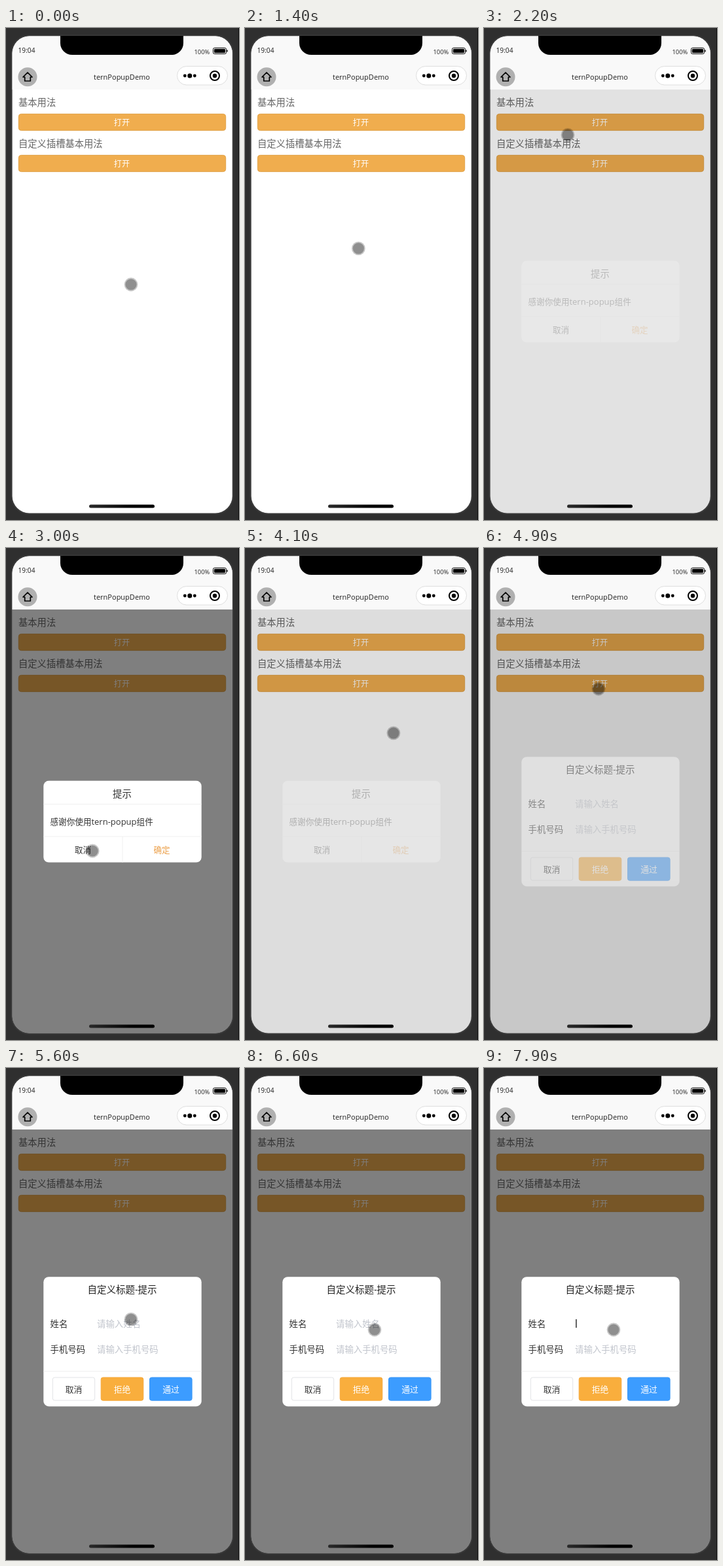
These frames come from a looping animation (356 by 752 pixels, 8 s). An HTML page:

```html
<!DOCTYPE html>
<html lang="zh-CN">
<head>
<meta charset="utf-8">
<title>Modal demo</title>
<style>
  html, body { margin: 0; height: 100%; overflow: hidden; background: #2f2f2f; }
  svg { display: block; width: 100vw; height: 100vh; }
  text { font-family: "Open Sans", "Noto Sans CJK SC", "Noto Sans CJK", sans-serif; }
  .mid { text-anchor: middle; }
  .line { stroke: #f0f0f0; }
</style>
</head>
<body>
<svg viewBox="0 0 356 752">
  <defs>
    <clipPath id="screen"><rect x="9.6" y="12.6" width="336.2" height="728.8" rx="26"/></clipPath>
    <linearGradient id="bar"><stop stop-color="#2a2a2a"/><stop offset=".7"/></linearGradient>
  </defs>
  <rect width="356" height="752" fill="#2f2f2f"/>
  <rect x="355" width="1" height="752" fill="#0c0c0c"/>
  <rect x="9" y="12" width="337.4" height="730" rx="26.5" fill="none" stroke="#3a3a3a" stroke-width="3"/>

  <g clip-path="url(#screen)">
    <rect x="9" y="12" width="338" height="731" fill="#fff"/>
    <rect x="9" y="12" width="338" height="82" fill="#f9f9f9"/>

    <g font-size="14.3" fill="#666">
      <text x="19" y="119">基本用法</text>
      <text x="19" y="182">自定义插槽基本用法</text>
    </g>
    <g fill="#f0ad4e" stroke="#e0a044">
      <rect x="19.3" y="131.4" width="316.4" height="25.2" rx="4"/>
      <rect x="19.3" y="194.4" width="316.4" height="25.2" rx="4"/>
    </g>
    <g class="mid" font-size="12.2" fill="#fff">
      <text x="177" y="149">打开</text>
      <text x="177" y="212">打开</text>
    </g>

    <rect id="mask" x="9" y="94" width="338" height="649" opacity="0"/>

    <g id="basic" opacity="0">
      <rect x="57.3" y="355.8" width="241.4" height="124.8" rx="8" fill="#fff"/>
      <path class="line" d="M57.3 391.5H298.7M57.3 441H298.7M178 441V480.6"/>
      <text class="mid" x="177.5" y="381.3" font-size="14.4" fill="#333">提示</text>
      <text x="67.5" y="423" font-size="12.6" fill="#333">感谢你使用<tspan font-size="13">tern-popup</tspan>组件</text>
      <g class="mid" font-size="12.6">
        <text x="117.5" y="466" fill="#333">取消</text>
        <text x="238" y="466" fill="#eca04a">确定</text>
      </g>
    </g>

    <g id="custom" opacity="0">
      <rect x="57.3" y="319.2" width="241.4" height="198" rx="8" fill="#fff"/>
      <path class="line" d="M57.3 463.5H298.7"/>
      <text class="mid" x="177.5" y="344.3" font-size="14.5" fill="#222">自定义标题-提示</text>
      <g font-size="13.4">
        <text x="67.5" y="396" fill="#333">姓名</text>
        <text x="67.5" y="435.3" fill="#333">手机号码</text>
        <text id="hint" x="139" y="396" fill="#c0c4cc">请输入姓名</text>
        <text x="139" y="435.3" fill="#c0c4cc">请输入手机号码</text>
      </g>
      <rect id="caret" x="140.2" y="384" width="1.4" height="13" fill="#222"/>
      <rect x="71.3" y="473" width="64.4" height="35" rx="3" fill="#fff" stroke="#e2e3e6"/>
      <rect x="145.2" y="473" width="64.6" height="35.2" rx="3" fill="#f9ae3d" stroke="#f5a738"/>
      <rect x="219.5" y="473" width="64.6" height="35.2" rx="3" fill="#3c9cff" stroke="#3a97f6"/>
      <g class="mid" font-size="12.8" fill="#fff">
        <text x="103.5" y="495.8" fill="#333">取消</text>
        <text x="177.5" y="495.8">拒绝</text>
        <text x="252" y="495.8">通过</text>
      </g>
    </g>
  </g>

  <!-- status and navigation bars -->
  <path d="M83 12H271V23A18 18 0 0 1 253 41H101A18 18 0 0 1 83 23Z"/>
  <text x="18.5" y="38" font-size="10.2" fill="#222">19:04</text>
  <text x="287.5" y="39.5" font-size="9.4" fill="#222">100%</text>
  <rect x="316.5" y="30.5" width="20" height="9" rx="2" fill="none" stroke="#000"/>
  <rect x="318" y="32" width="17" height="6" rx="1"/>
  <rect x="337.5" y="33.5" width="1.3" height="3"/>
  <circle cx="33" cy="74.8" r="14.5" fill="#b0b0b0"/>
  <path d="M33 68L26 75H28.7V81H37.3V75H40Z" fill="none" stroke="#000" stroke-width="1.7" stroke-linejoin="round"/>
  <text class="mid" x="177" y="79" font-size="11" fill="#222">ternPopupDemo</text>
  <rect x="261.5" y="58.5" width="77" height="28.5" rx="14.2" fill="#fff" stroke="#dedede"/>
  <circle cx="273.3" cy="73" r="2.4"/>
  <circle cx="280.8" cy="73" r="3.5"/>
  <circle cx="288.3" cy="73" r="2.4"/>
  <circle cx="319" cy="73" r="7" fill="none" stroke="#000" stroke-width="2"/>
  <circle cx="319" cy="73" r="3.2"/>
  <rect x="127" y="728.6" width="100" height="5" rx="2.5" fill="url(#bar)"/>

  <g id="pointer">
    <circle r="10.4" opacity=".22"/>
    <circle r="8.6" opacity=".28"/>
  </g>
</svg>
<script>
const LOOP = 8000, FADE = 300;
const el = id => document.getElementById(id);
const show = (id, alpha) => el(id).setAttribute('opacity', alpha);

// Pointer stops: time, x, y
const stops = [
  [0, 191, 392], [350, 191, 392], [1100, 178, 356], [1350, 178, 356],
  [1900, 128, 150], [2120, 128, 150], [2200, 128, 163], [2850, 132, 455],
  [3000, 132, 463], [3500, 241, 467], [3600, 241, 465], [3900, 234, 348],
  [4100, 227, 283], [4600, 176, 208], [4820, 176, 208], [4900, 175, 215],
  [5600, 191, 384], [5700, 193, 399], [5800, 194, 408], [6250, 194, 408],
  [6600, 198, 400], [LOOP, 198, 400]
];

// The CSS "ease" curve
function ease(p) {
  if (p <= 0) return 0;
  if (p >= 1) return 1;
  let lo = 0, hi = 1, u = .5;
  for (let i = 0; i < 20; i++) {
    u = (lo + hi) / 2;
    if (.75 * u * (1 - u) + u ** 3 < p) lo = u; else hi = u;
  }
  return .3 * u * (1 - u) ** 2 + 3 * u * u * (1 - u) + u ** 3;
}

const fade = (t, start) => ease((t - start) / FADE);

function pointerAt(t) {
  const i = stops.findIndex(s => s[0] > t);
  const [t0, x0, y0] = stops[i - 1], [t1, x1, y1] = stops[i];
  const k = (t - t0) / (t1 - t0);
  return [x0 + (x1 - x0) * k, y0 + (y1 - y0) * k];
}

function draw(t) {
  const basic = fade(t, 2150) - fade(t, 3970);
  const custom = fade(t, 4823);
  show('basic', basic);
  show('custom', custom);
  show('mask', Math.max(basic, custom) / 2);
  const focused = t >= 7100;
  show('hint', focused ? 0 : 1);
  show('caret', focused && (t < 7400 || t >= 7900) ? 1 : 0);
  el('pointer').setAttribute('transform', `translate(${pointerAt(t)})`);
}

const start = performance.now();
function tick() {
  draw((performance.now() - start) % LOOP);
  requestAnimationFrame(tick);
}
tick();
</script>
</body>
</html>
```
